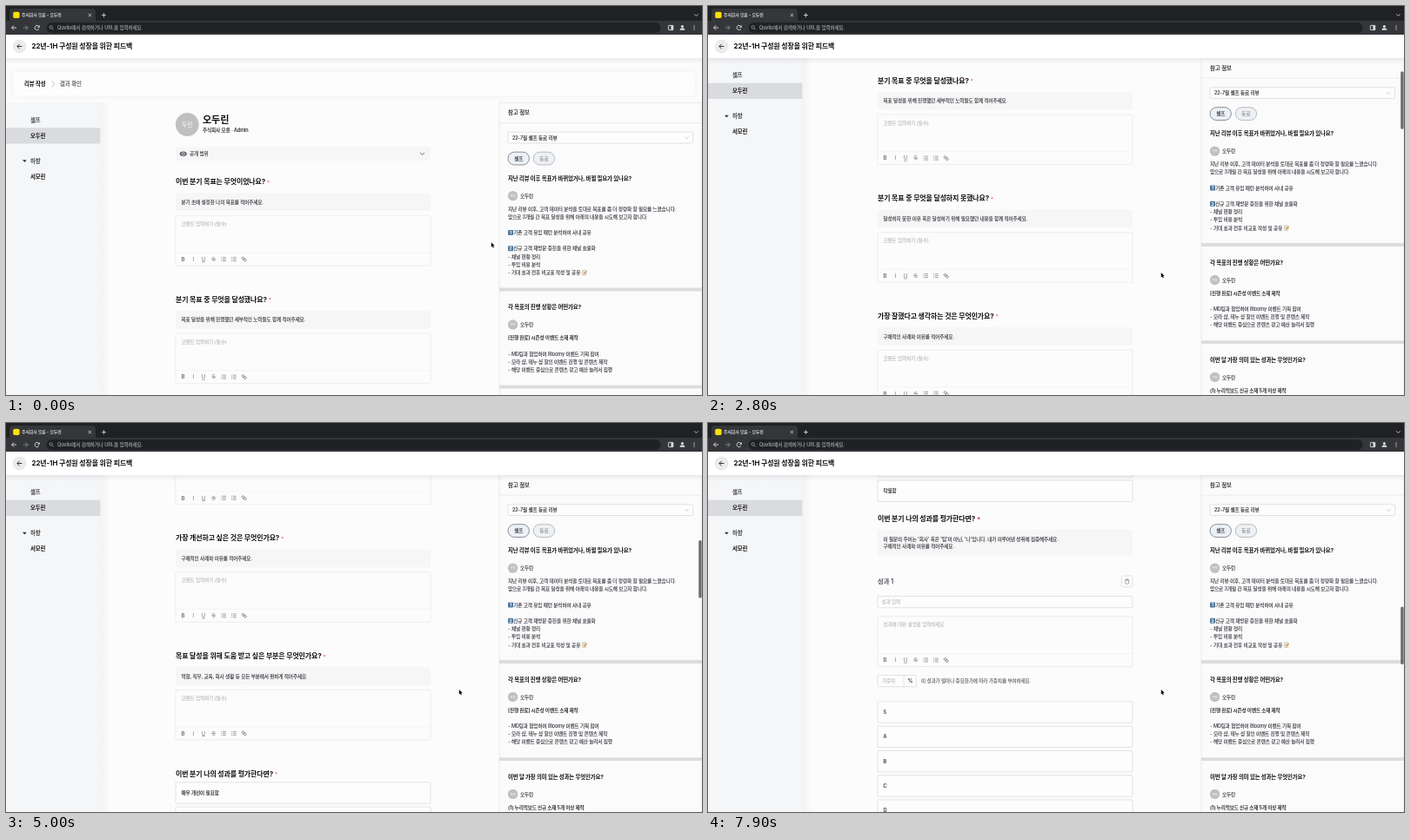
Recreate the animation shown at these times as an HTML page with a canvas. Size 800 by 448 pixels, loop 8 s.

```html
<!DOCTYPE html>
<html lang="ko">
<head>
<meta charset="utf-8">
<title>피드백</title>
<style>
html, body { margin: 0; width: 100%; height: 100%; overflow: hidden; background: #fcfcfd; }
canvas { display: block; width: 800px; height: 448px; }
</style>
</head>
<body>
<canvas id="stage"></canvas>
<script>
const W = 800, H = 448, LOOP = 8000, STEP = 100;
const canvas = document.getElementById('stage');
const ctx = canvas.getContext('2d');
const dpr = window.devicePixelRatio || 1;
canvas.width = W * dpr;
canvas.height = H * dpr;

const FONT = 'Inter, "Noto Sans CJK KR", "Noto Sans CJK", sans-serif';
const BODY = 5.83, MID = 6.67, BIG = 8.33;
const INK = '#111', TEXT = '#3a3c42', PALE = '#bcbdc1', EDGE = '#e2e2e5', ICON = '#77787c';
const PERSON = '오두린', SHORT = '두린', COMPANY = '주식회사 모룬';
const LEFT = 195, WIDE = 293, STICK = 51.5;

const QUESTIONS = [
  ['이번 분기 목표는 무엇이었나요?', '분기 초에 설정한 나의 목표를 적어주세요.'],
  ['분기 목표 중 무엇을 달성했나요?', '목표 달성을 위해 진행했던 세부적인 노력들도 함께 적어주세요.'],
  ['분기 목표 중 무엇을 달성하지 못했나요?', '달성하지 못한 이유 혹은 달성하기 위해 필요했던 내용을 함께 적어주세요.'],
  ['가장 잘했다고 생각하는 것은 무엇인가요?', '구체적인 사례와 이유를 적어주세요.'],
  ['가장 개선하고 싶은 것은 무엇인가요?', '구체적인 사례와 이유를 적어주세요.'],
  ['목표 달성을 위해 도움 받고 싶은 부분은 무엇인가요?', '역할, 직무, 교육, 회사 생활 등 모든 부분에서 편하게 적어주세요.']
];
const RATINGS = ['매우 개선이 필요함', '개선이 필요함', '기대를 꾸준히 충족함', '기대를 초과함', '탁월함'];
const GRADES = ['S', 'A', 'B', 'C', 'D'];

// Scroll position over time: [ms, px]
const SCROLL = [[600, 0], [1600, 58.5], [2800, 252], [3600, 413], [5000, 612], [6000, 800],
  [6100, 800], [6600, 925.5], [7000, 945], [7200, 945], [7900, 1073]];

const secant = i => (SCROLL[i + 1][1] - SCROLL[i][1]) / (SCROLL[i + 1][0] - SCROLL[i][0]);

function slope(i) {
  if (i === 0) return 0;
  if (i === SCROLL.length - 1) return secant(i - 1);
  const a = secant(i - 1), b = secant(i);
  return a * b > 0 ? 2 * a * b / (a + b) : 0;
}

// Monotone cubic interpolation
function scrollAt(t) {
  if (t <= SCROLL[0][0]) return 0;
  let i = 0;
  while (i < SCROLL.length - 2 && t > SCROLL[i + 1][0]) i++;
  const [t0, a] = SCROLL[i], [t1, b] = SCROLL[i + 1];
  const d = t1 - t0, u = (t - t0) / d, v = 1 - u;
  return a * (1 + 2 * u) * v * v + slope(i) * d * u * v * v
       + b * u * u * (3 - 2 * u) - slope(i + 1) * d * u * u * v;
}

// y is the optical middle of the line; returns the text width.
// Weight 500 is regular with a hairline outline, as CJK fonts often lack a medium cut.
function text(str, x, y, size = BODY, color = TEXT, weight = 500, align = 'left') {
  const k = 4, em = size * 0.96 * k, medium = weight === 500;
  ctx.save();
  ctx.translate(x, y + size * 0.365);
  ctx.scale(1 / k, 1 / k);
  ctx.font = `${medium ? 400 : weight} ${em}px ${FONT}`;
  ctx.letterSpacing = `${-0.02 * em}px`;
  ctx.textAlign = align;
  ctx.fillStyle = ctx.strokeStyle = color;
  ctx.lineWidth = 0.025 * em;
  ctx.lineJoin = 'round';
  ctx.fillText(str, 0, 0);
  if (medium) ctx.strokeText(str, 0, 0);
  const w = ctx.measureText(str).width / k;
  ctx.restore();
  return w;
}

function box(x, y, w, h, fill, stroke, r = 0, lw = 0.6) {
  ctx.beginPath();
  ctx.roundRect(x, y, w, h, r);
  if (fill) { ctx.fillStyle = fill; ctx.fill(); }
  if (stroke) { ctx.strokeStyle = stroke; ctx.lineWidth = lw; ctx.stroke(); }
}

function disc(x, y, r, fill, stroke, lw = 0.8) {
  box(x - r, y - r, 2 * r, 2 * r, fill, stroke, r, lw);
}

function line(color, lw, ...p) {
  ctx.beginPath();
  for (let i = 0; i < p.length; i += 2) ctx.lineTo(p[i], p[i + 1]);
  ctx.strokeStyle = color;
  ctx.lineWidth = lw;
  ctx.stroke();
}

function poly(fill, ...p) {
  ctx.beginPath();
  for (let i = 0; i < p.length; i += 2) ctx.lineTo(p[i], p[i + 1]);
  ctx.closePath();
  ctx.fillStyle = fill;
  ctx.fill();
}

function fade(x, y, w, h, alpha, across) {
  const g = across ? ctx.createLinearGradient(x, 0, x + w, 0) : ctx.createLinearGradient(0, y, 0, y + h);
  g.addColorStop(0, `rgba(30,32,40,${alpha})`);
  g.addColorStop(1, 'rgba(30,32,40,0)');
  ctx.fillStyle = g;
  ctx.fillRect(x, y, w, h);
}

function chevron(x, y, w, color, lw = 0.8) {
  line(color, lw, x - w, y - w / 2, x, y + w / 2, x + w, y - w / 2);
}

function arrow(x, y, dir, color) {
  line(color, 0.9, x - 2.8 * dir, y, x + 2.8 * dir, y);
  line(color, 0.9, x, y - 2.7, x + 2.7 * dir, y, x, y + 2.7);
}

function avatar(x, y, r, size) {
  disc(x, y, r, '#bfc0c1');
  text(SHORT, x, y, size, '#fff', 400, 'center');
}

function formatIcons(y) {
  ['B', 'I', 'U', 'S'].forEach((c, i) =>
    text(c, 203.5 + i * 11.7, y, 6.4, ICON, ['700', 'italic 400', '400', '400'][i], 'center'));
  line(ICON, 0.6, 225, y + 3.2, 229, y + 3.2);
  line(ICON, 0.6, 236, y, 241.3, y);
  for (const x of [250.2, 262]) {
    for (const d of [-2, 0, 2]) {
      line(ICON, 0.7, x - 1.2, y + d, x + 2.7, y + d);
      line(ICON, 0.8, x - 2.8, y + d, x - 2, y + d);
    }
  }
  ctx.save();
  ctx.translate(273.7, y);
  ctx.rotate(0.7);
  box(-3, -1.2, 3.3, 2.4, null, ICON, 1.2, 0.8);
  box(-0.3, -1.2, 3.3, 2.4, null, ICON, 1.2, 0.8);
  ctx.restore();
}

function editor(y, hint) {
  box(LEFT, y, WIDE, 57.5, '#fcfcfc', EDGE, 1);
  text(hint, 201.5, y + 9.3, BODY, PALE);
  line('#ededef', 0.6, LEFT, y + 42.6, LEFT + WIDE, y + 42.6);
  formatIcons(y + 50);
}

function heading(str, y, star = 6, red = '#f0525a') {
  const w = text(str, LEFT, y, BIG, INK, 700);
  text('*', LEFT + w + 2, y + 1.4, star, red, 600);
}

function options(list, y) {
  list.forEach((label, i) => {
    const c = y + i * 28.3;
    box(LEFT, c - 12.2, WIDE, 24.4, '#fdfdfd', '#d2d2d6', 1);
    text(label, 201.5, c, BODY, '#222');
  });
}

function profile() {
  avatar(208.3, 136.5, 13.4, 7.2);
  text(PERSON, 226, 131.2, 11.67, INK, 700);
  text(COMPANY + ' · Admin', 226, 142.6, BODY, '#222');
  box(LEFT, 162.2, WIDE, 16, '#f6f6f7', null, 2);
  ctx.beginPath();
  ctx.ellipse(203.7, 170.2, 4, 2.7, 0, 0, 7);
  ctx.fillStyle = '#5b5f68';
  ctx.fill();
  disc(203.7, 170.2, 1.5, '#5b5f68', '#fff', 0.7);
  text('공개 범위', 211, 170.2);
  chevron(478.5, 170.2, 2.5, '#555');
}

function achievement() {
  heading('이번 분기 나의 성과를 평가한다면?', 1183, 8.33, '#d9303c');
  box(LEFT, 1196, WIDE, 29.5, '#f6f6f7', null, 2);
  text("이 질문의 주어는 '회사' 혹은 '팀'이 아닌, '나'입니다. 내가 이루어낸 성취에 집중해주세요.", 201.5, 1206.5);
  text('구체적인 사례와 이유를 적어주세요.', 201.5, 1215);
  text('성과 1', LEFT, 1255.5, 7.7);
  box(475.2, 1249, 12.8, 12.8, '#fcfcfc', '#d2d2d6', 1.5);
  box(479.8, 1254, 3.7, 4.2, null, ICON, 0.5);
  line(ICON, 0.6, 478.9, 1253.6, 484.4, 1253.6);
  line(ICON, 0.6, 480.8, 1252.7, 482.5, 1252.7);
  box(LEFT, 1272.5, WIDE, 13.2, '#fdfdfd', '#d2d2d6', 1);
  text('성과 입력', 199.5, 1279.1, BODY, PALE);
  editor(1296, '성과에 대한 설명을 입력하세요.');
  box(LEFT, 1363.5, 44.5, 13.2, '#fdfdfd', '#d2d2d6', 1);
  line('#d2d2d6', 0.6, 225.2, 1363.5, 225.2, 1376.7);
  text('가중치', 200, 1370.2, BODY, PALE);
  text('%', 232.4, 1370.2, BODY, '#222', 600, 'center');
  text('이 성과가 얼마나 중요한가에 따라 가중치를 부여하세요.', 245, 1370.2, BODY, '#66686d');
  options(GRADES, 1406);
}

function form() {
  profile();
  QUESTIONS.forEach(([title, hint], i) => {
    const y = 202.2 + i * 135.55;
    heading(title, y);
    box(LEFT, y + 13.4, WIDE, 20.4, '#f6f6f7', null, 2);
    text(hint, 201.5, y + 23.6);
    editor(y + 39.4, '코멘트 입력하기 (필수)');
  });
  heading('이번 분기 나의 성과를 평가한다면?', 1015.5);
  options(RATINGS, 1038);
  achievement();
}

function breadcrumb() {
  ctx.save();
  ctx.shadowColor = 'rgba(30,32,40,.06)';
  ctx.shadowBlur = 8 * dpr;
  box(8.5, 76, 783, 27, '#fdfdfd', null, 2);
  ctx.restore();
  text('리뷰 작성', 21, 89.7, MID, INK, 700);
  line('#b5b6ba', 0.8, 52.8, 85.8, 55.8, 89.7, 52.8, 93.6);
  text('결과 확인', 62, 89.7, MID, '#55575c');
}

function sidebar() {
  fade(108, 111, 12, H, 0.045, true);
  box(0, 111, 108.3, H, '#f5f6f8');
  text('셀프', 28, 131.2, MID, '#333');
  box(0, 140.2, 108.3, 18.4, '#dadbde');
  text(PERSON, 28, 149.4, MID, INK, 700);
  poly('#333', 19, 177.2, 23.8, 177.2, 21.4, 180);
  text('하향', 28, 178.3, MID, '#333');
  text('서모린', 28, 196.5, MID, INK, 700);
}

function pill(x, label, ink, edge, fill) {
  box(x, 168.2, 24.4, 14.8, fill, edge, 7.4, 0.7);
  text(label, x + 12.2, 175.8, BODY, ink, 500, 'center');
}

function numbered(n, str, y) {
  box(577, y - 3, 6, 6, '#527b9f', null, 0.8);
  text(n, 580, y, 4.8, '#fff', 700, 'center');
  text(str, 583.2, y);
}

function answer(title, y) {
  text(title, 577, y, MID, INK, 700);
  avatar(582.6, y + 20.3, 5.7, 3.6);
  text(PERSON, 591, y + 20.3, BODY, '#333');
}

function memo(x, y) {
  box(x, y - 2.8, 4.6, 5.8, '#f1ead9', '#b9ad98', 0.5, 0.5);
  line('#a9a396', 0.4, x + 1, y - 1, x + 3, y - 1);
  line('#a9a396', 0.4, x + 1, y + 0.4, x + 3, y + 0.4);
  line('#c9823a', 1.1, x + 2, y + 1.8, x + 5.2, y - 1.6);
}

function panel() {
  box(567, 111.3, 233, H, '#fbfbfc', '#dcdcdf');
  text('참고 정보', 577, 123, MID, '#222');
  line('#dfdfe2', 0.6, 567, 134.6, 800, 134.6);
  box(577, 145.2, 212.5, 12.8, '#fdfdfd', '#d2d2d6', 1.2);
  text('22-7월 셀프 동료 리뷰', 582, 151.8, BODY, '#222');
  chevron(782.4, 151.8, 2.1, '#aaa', 0.6);
  pill(577, '셀프', '#2d3640', '#5b6570', '#edf1f5');
  pill(606.2, '동료', '#8b9299', '#9da4ab', '#eef0f3');

  answer('지난 리뷰 이후 목표가 바뀌었거나, 바뀔 필요가 있나요?', 198.3);
  text('지난 리뷰 이후, 고객 데이터 분석을 토대로 목표를 좀 더 정량화 할 필요를 느꼈습니다.', 577, 233.7);
  text('앞으로 3개월 간 목표 달성을 위해 아래의 내용을 시도해 보고자 합니다.', 577, 242.8);
  numbered('1', '기존 고객 유입 패턴 분석하여 사내 공유', 261);
  numbered('2', '신규 고객 재방문 증진을 위한 채널 효율화', 279.3);
  ['- 채널 현황 정리', '- 투입 비용 분석', '- 기대 효과 전후 비교표 작성 및 공유'].forEach((s, i) =>
    text(s, 577, 288.6 + i * 9.15));
  memo(662.3, 307);
  box(567, 324.6, 233, 3.8, '#dcdcde');

  answer('각 목표의 진행 상황은 어떤가요?', 346.7);
  text('[진행 완료] 시즌성 이벤트 소재 제작', 577, 382, BODY, '#333', 700);
  ['- MD팀과 협업하여 Bloomy 이벤트 기획 참여', '- 모라 샵, 테누 샵 할인 이벤트 진행 및 콘텐츠 제작',
    '- 해당 이벤트 중심으로 콘텐츠 광고 예산 늘려서 집행'].forEach((s, i) => text(s, 577, 400.5 + i * 9.15));
  box(567, 436.7, 233, 3.8, '#dcdcde');

  answer('이번 달 가장 의미 있는 성과는 무엇인가요?', 458.6);
  text('(1) 누리픽보드 신규 소재 5개 이상 제작', 577, 494, BODY, '#333', 700);
}

function header() {
  fade(0, 60, W, 7, 0.07);
  box(0, 33, W, 27, '#fff');
  disc(15.6, 46.5, 7.4, '#ececee', '#dadadd', 0.5);
  arrow(15.6, 46.5, -1, '#222');
  text('22년-1H 구성원 성장을 위한 피드백', 29.6, 46.3, BIG, INK, 700);
}

function browser() {
  const pale = '#dfe1e5', dim = '#85888d';
  box(0, 0, W, 33, '#202124');
  box(4, 3, 99, 20, '#35363a', null, 3.5);
  box(0, 17, W, 16, '#35363a');
  box(8.2, 6.7, 7.4, 7.4, '#f9e000', null, 1.8);
  text(`${COMPANY} - ${PERSON}`, 18, 10.5, 5.1, pale);
  line(pale, 0.8, 94.7, 8.8, 98.1, 12.2);
  line(pale, 0.8, 98.1, 8.8, 94.7, 12.2);
  line(pale, 0.8, 110, 10.5, 115, 10.5);
  line(pale, 0.8, 112.5, 8, 112.5, 13);
  chevron(793.4, 10.4, 2.2, pale);
  arrow(9.2, 25, -1, pale);
  arrow(22.6, 25, 1, dim);
  ctx.beginPath();
  ctx.arc(35.7, 25, 2.6, 0.5, 5.6);
  ctx.strokeStyle = pale;
  ctx.lineWidth = 0.9;
  ctx.stroke();
  poly(pale, 38.7, 22, 38.7, 24.8, 35.9, 24.8);
  box(46.5, 19, 706, 12, '#202124', null, 6);
  disc(51.7, 24.4, 1.7, null, '#9aa0a6');
  line('#9aa0a6', 0.8, 53, 25.7, 54.7, 27.4);
  text('Quvlio에서 검색하거나 URL을 입력하세요.', 59, 25, BODY, '#9aa0a6');
  box(761.4, 22.4, 5.4, 5.2, null, pale, 0.4, 0.9);
  box(764.4, 22.4, 2.4, 5.2, pale);
  disc(777.4, 23.4, 1.5, pale);
  box(774.6, 25.6, 5.6, 2.2, pale, null, [1.6, 1.6, 0, 0]);
  for (const d of [-2.1, 0, 2.1]) disc(791, 25 + d, 0.65, pale);
}

function pointer(t) {
  const u = Math.min(t / 200, 1);
  ctx.save();
  ctx.translate(557.8 - 37 * u, 272.2 + 34.8 * u);
  ctx.scale(0.85, 0.85);
  ctx.beginPath();
  [[0, 0], [0, 6.6], [1.5, 5.3], [2.5, 7.6], [3.5, 7.1], [2.6, 4.9], [4.6, 4.8]].forEach(p => ctx.lineTo(...p));
  ctx.closePath();
  ctx.strokeStyle = '#fff';
  ctx.lineWidth = 1;
  ctx.stroke();
  ctx.fillStyle = '#000';
  ctx.fill();
  ctx.restore();
}

function shifted(dy, draw) {
  ctx.save();
  ctx.translate(0, -dy);
  draw();
  ctx.restore();
}

function render(t) {
  const s = scrollAt(t), stuck = Math.min(s, STICK);
  ctx.setTransform(dpr, 0, 0, dpr, 0, 0);
  box(0, 0, W, H, '#fcfcfd');
  shifted(s, breadcrumb);
  shifted(stuck, sidebar);
  shifted(s, form);
  shifted(stuck, panel);
  header();
  if (s > 0) box(796.2, 33.5 + s * 0.166, 3.4, 66.5, '#6c6c6e', null, 1.7);
  browser();
  pointer(t);
}

const start = performance.now();
function tick() {
  const t = (performance.now() - start) % LOOP;
  render(Math.floor(t / STEP) * STEP);
  requestAnimationFrame(tick);
}
tick();
</script>
</body>
</html>
```
